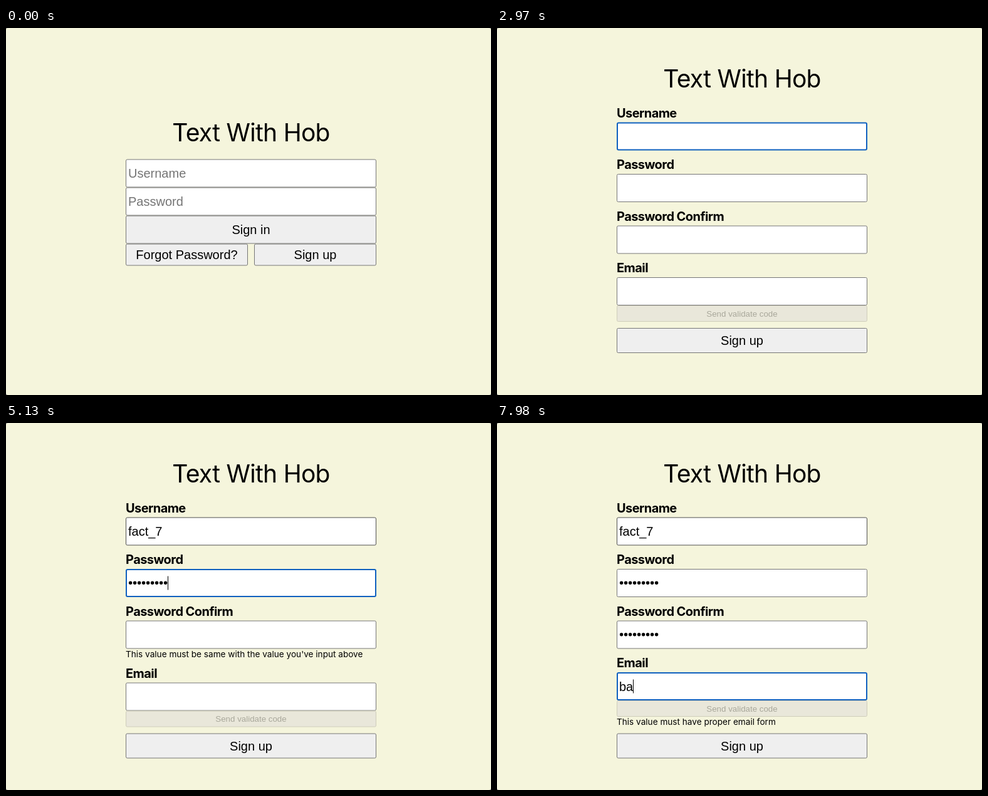
An HTML page with a canvas for the animation above (8 s loop, 774 px wide and 586 px high).

```html
<!DOCTYPE html>
<html lang="en">
<head>
<meta charset="utf-8">
<title>Sign up form</title>
<style>
  html, body { margin: 0; width: 100%; height: 100%; overflow: hidden; background: #777; }
  canvas { display: block; }
</style>
</head>
<body>
<canvas id="stage" width="774" height="586"></canvas>
<script>
const ctx = document.getElementById('stage').getContext('2d');
const LOOP = 8000;
const LEFT = 191, WIDTH = 400, CENTER = 391;
const SANS = '"Liberation Sans", Arial, sans-serif';
const UI = 'Inter, sans-serif';
const TITLE = 'Text With Hob';
const BEIGE = '#f5f5dc', BORDER = '#767676', DARK_BORDER = '#4f4f4f';
const LINE = 16.5;
const PAGE_SWITCH = 1500;
const POINTER_HIDDEN = 2970;

// focus: [from, to]; keys: time of each keystroke; a message shows while 0 < typed < valid.
const fields = [
  { label: 'Username', focus: [2170, 4110], value: 'fact_7', valid: 5,
    keys: [3000, 3120, 3300, 3420, 3750, 3900],
    message: ['This value must consist of 5 to 20 characters with small', 'letters, numbers and underscores'] },
  { label: 'Password', focus: [4110, 5310], secret: true, valid: 9,
    keys: [4290, 4350, 4440, 4500, 4650, 4695, 4740, 4890, 5130],
    message: ['This value must consist of 9 to 20 characters with small', 'letters, numbers and special symbols'] },
  { label: 'Password Confirm', focus: [5310, 7290], secret: true, valid: 9, messageFrom: 4290,
    keys: [5800, 5850, 5910, 6060, 6130, 6200, 6270, 6420, 6660],
    message: ["This value must be same with the value you've input above"] },
  { label: 'Email', focus: [7290, LOOP], value: 'ba', valid: 9, sendButton: true,
    keys: [7830, 7980],
    message: ['This value must have proper email form'] }
];

function text(str, x, y, font, color = '#000', align = 'left', spacing = 0) {
  ctx.font = font;
  ctx.fillStyle = color;
  ctx.textAlign = align;
  ctx.letterSpacing = spacing + 'px';
  ctx.fillText(str, x, y);
}

function box(x, y, w, h, fill, border, line = 1) {
  ctx.beginPath();
  ctx.roundRect(x + line / 2, y + line / 2, w - line, h - line, 2);
  ctx.fillStyle = fill;
  ctx.fill();
  ctx.lineWidth = line;
  ctx.strokeStyle = border;
  ctx.stroke();
}

function button(label, x, y, w, h, hovered = false) {
  box(x, y, w, h, hovered ? '#e6e6e3' : '#efefef', hovered ? DARK_BORDER : BORDER);
  text(label, x + w / 2, y + h / 2 + 7, '20px ' + SANS, '#000', 'center');
}

function title(baseline) {
  text(TITLE, CENTER, baseline, '39px ' + UI, '#000', 'center', -0.7);
}

const inside = (p, x, y, w, h) => !!p && p.x >= x && p.x < x + w && p.y >= y && p.y < y + h;

const ease = u => u * u * (3 - 2 * u);

function glide(t, from, to, a, c, b) {
  const u = ease(Math.min(1, Math.max(0, (t - from) / (to - from))));
  const mix = k => (1 - u) ** 2 * a[k] + 2 * u * (1 - u) * c[k] + u * u * b[k];
  return { x: mix(0), y: mix(1) };
}

function pointerAt(t) {
  if (t < 210 || t >= POINTER_HIDDEN) return null;
  if (t < 600) return glide(t, 190, 330, [364, 470], [310, 340], [270, 231]);
  if (t < PAGE_SWITCH) return glide(t, 590, 1200, [270, 231], [340, 525], [501, 362]);
  return glide(t, PAGE_SWITCH, 2170, [501, 362], [470, 270], [430, 173]);
}

function drawPointer(p, beam) {
  ctx.save();
  ctx.translate(p.x, p.y);
  ctx.lineJoin = 'round';
  ctx.beginPath();
  if (beam) {
    ctx.moveTo(-3, -8.5);
    ctx.quadraticCurveTo(0, -8.5, 0, -6);
    ctx.quadraticCurveTo(0, -8.5, 3, -8.5);
    ctx.moveTo(0, -6);
    ctx.lineTo(0, 6);
    ctx.quadraticCurveTo(0, 8.5, -3, 8.5);
    ctx.moveTo(0, 6);
    ctx.quadraticCurveTo(0, 8.5, 3, 8.5);
    ctx.lineWidth = 1;
    ctx.strokeStyle = '#222';
    ctx.stroke();
  } else {
    [[0, 0], [0, 12.8], [2.8, 10.2], [4.9, 15.2], [6.9, 14.3], [4.9, 9.5], [8.8, 9.2]]
      .forEach(([x, y]) => ctx.lineTo(x, y));
    ctx.closePath();
    ctx.lineWidth = 2;
    ctx.strokeStyle = '#fff';
    ctx.stroke();
    ctx.fillStyle = '#000';
    ctx.fill();
  }
  ctx.restore();
}

function drawLogin(pointer) {
  title(181);
  ['Username', 'Password'].forEach((hint, i) => {
    const y = 209.5 + 45 * i;
    box(LEFT, y, WIDTH, 45, '#fff', BORDER);
    text(hint, 195, y + 29.5, '20px ' + SANS, '#757575');
  });
  button('Sign in', LEFT, 299.5, WIDTH, 45);
  button('Forgot Password?', LEFT, 344.5, 195, 35);
  button('Sign up', 396, 344.5, 195, 35, inside(pointer, 396, 344.5, 195, 35));
  return inside(pointer, LEFT, 209.5, WIDTH, 90);
}

function drawCaret(t, since, x, middle) {
  if ((t - since) % 1000 >= 470) return;
  ctx.fillStyle = '#000';
  ctx.fillRect(Math.round(x), middle - 11, 1, 22);
}

function drawValue(field, t, typed, middle) {
  let end = 195;
  if (field.secret) {
    ctx.fillStyle = '#000';
    for (let i = 0; i < typed; i++) {
      ctx.beginPath();
      ctx.arc(198.6 + 7 * i, middle - 0.2, 2.7, 0, 7);
      ctx.fill();
    }
    end += 7 * typed;
  } else {
    const str = field.value.slice(0, typed);
    text(str, 195, middle + 7, '20px ' + SANS);
    end += ctx.measureText(str).width;
  }
  const [from, to] = field.focus;
  if (t >= from && t < to) drawCaret(t, typed ? field.keys[typed - 1] : from, end - 0.4, middle);
}

function drawSignup(t, pointer) {
  title(94.5);
  let y = 150.5, beam = false;
  for (const field of fields) {
    const typed = field.keys.filter(k => k <= t).length;
    const focused = t >= field.focus[0] && t < field.focus[1];
    // The hidden pointer keeps resting on the first field.
    const over = inside(pointer, LEFT, y, WIDTH, 45);
    const hovered = over || (field === fields[0] && t >= POINTER_HIDDEN);
    beam = beam || over;

    text(field.label, LEFT, y - 8, 'bold 20px ' + UI, '#000', 'left', -0.57);
    if (focused) box(LEFT, y, WIDTH, 45, '#fff', '#0f60bf', 2);
    else box(LEFT, y, WIDTH, 45, '#fff', hovered ? DARK_BORDER : BORDER);
    drawValue(field, t, typed, y + 22.5);

    let bottom = y + 45;
    if (field.sendButton) {
      box(LEFT, bottom, WIDTH, 26, '#e9e7da', '#cfcdbb');
      text('Send validate code', CENTER, bottom + 17.5, '13.333px ' + SANS, '#a9a89b', 'center');
      bottom += 26;
    }
    const started = field.messageFrom ? t >= field.messageFrom : typed > 0;
    if (started && typed < field.valid) {
      for (const line of field.message) {
        text(line, LEFT, bottom + 13.3, '13.6px ' + UI);
        bottom += LINE;
      }
    }
    y = bottom + 37.5;
  }
  button('Sign up', LEFT, y - 27.5, WIDTH, 40);
  return beam;
}

function draw(t) {
  ctx.fillStyle = '#777';
  ctx.fillRect(0, 0, 774, 586);
  ctx.beginPath();
  ctx.roundRect(0, 0, 774, 586, 3);
  ctx.fillStyle = BEIGE;
  ctx.fill();

  const pointer = pointerAt(t);
  const beam = t < PAGE_SWITCH ? drawLogin(pointer) : drawSignup(t, pointer);
  if (pointer) drawPointer(pointer, beam);
}

const start = performance.now();
function tick() {
  draw((performance.now() - start) % LOOP);
  requestAnimationFrame(tick);
}
tick();
</script>
</body>
</html>
```
